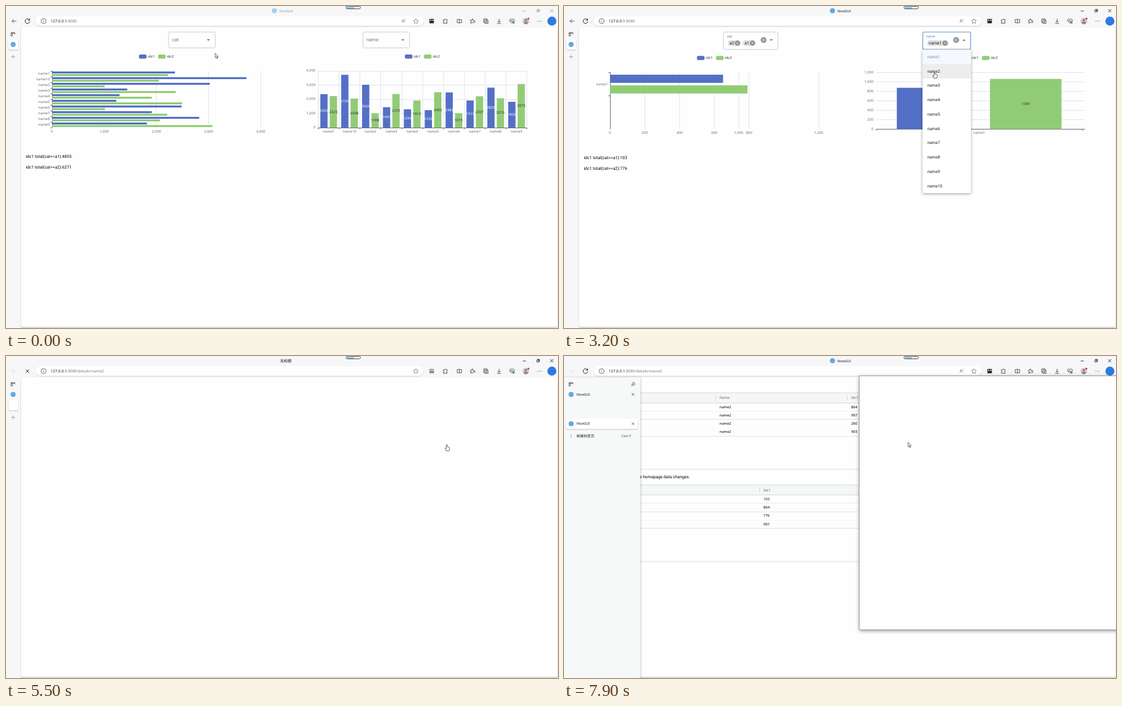
An HTML page with a canvas for the animation above (8000 ms loop, 876 by 511 pixels).

```html
<!DOCTYPE html>
<html lang="en">
<head>
<meta charset="utf-8">
<title>Dashboard</title>
<style>
html, body { margin: 0; width: 100%; height: 100%; overflow: hidden; background: #f7f7f8; }
canvas { display: block; }
</style>
</head>
<body>
<canvas id="stage" width="876" height="511"></canvas>
<script>
const ctx = document.getElementById('stage').getContext('2d');
const UI = '"Noto Sans", "Noto Sans CJK SC", sans-serif', PAGE = 'Roboto, sans-serif';
const BLUE = '#5470c6', GREEN = '#91cc75', PRIMARY = '#5898d4', LOGO = '#62a8e5';
const INK = '#333', AXIS = '#6e7079', GRID = '#e0e6f1';
const LOOP = 8000, STEP = 100;

// ---- data ----
const NAMES = ['name1', 'name10', ...[2, 3, 4, 5, 6, 7, 8, 9].map(i => 'name' + i)];
const all = [[2356, 3725, 3024, 1441, 1294, 1232, 2483, 1913, 2820, 1820],
             [2223, 2048, 1008, 2370, 1913, 2493, 1015, 2207, 2070, 3073]];
const a1 = [[103, 992, 864, 213, 76, 601, 499, 689, 710, 108],
            [977, 779, 186, 790, 705, 542, 159, 61, 501, 951]];
const a2 = [[776, 950, 997, 420, 510, 230, 760, 388, 720, 520],
            [92, 410, 342, 640, 520, 810, 330, 900, 620, 880]];
const both = a1.map((row, k) => row.map((v, i) => v + a2[k][i]));
const pick = ids => both.map(row => ids.map(i => row[i]));
const state = (at, names, values, max, step, cats, chosen, totals) =>
  ({ at, names, values, max, step, cats, chosen, totals });
const STATES = [
  state(-1e4, NAMES, all, 4000, 1000, [], [], [4855, 6271]),
  state(834, NAMES, a1, 1000, 200, ['a1'], [], [4855, 0]),
  state(1500, NAMES, both, 2000, 500, ['a2', 'a1'], [], [4855, 6271]),
  state(2947, ['name1'], pick([0]), 1200, 200, ['a2', 'a1'], ['name1'], [103, 776]),
  state(3700, ['name1', 'name2'], pick([0, 2]), 2100, 300, ['a2', 'a1'], ['name1', 'name2'], [967, 1773])
];
const TRACK = [
  [0, 332, 75], [500, 295, 54], [800, 272, 79], [900, 272, 80], [1100, 285, 99], [1500, 285, 99],
  [2000, 380, 60], [2400, 600, 54], [2700, 590, 78], [3000, 590, 78], [3200, 588, 104], [3700, 588, 104],
  [4300, 539, 162], [4500, 542, 163], [4800, 765, 175], [5100, 699.5, 140], [6100, 699.5, 140],
  [6500, 120, 160], [6900, 57, 85], [7100, 14, 78], [7600, 30, 76], [7700, 60, 104], [7900, 546, 137]
];

// ---- helpers ----
const clamp = v => Math.max(0, Math.min(1, v));
const mix = (a, b, p) => a + (b - a) * p;
const cubicInOut = u => u < .5 ? 4 * u ** 3 : 1 - (2 - 2 * u) ** 3 / 2;
const between = (t, a, b) => t >= a && t < b;

function text(str, x, y, size, color = INK, font = UI, align = 'left') {
  ctx.font = `${size}px ${font}`;
  ctx.textAlign = align;
  ctx.fillStyle = color;
  ctx.fillText(str, x, y);
}
function rect(x, y, w, h, color) {
  ctx.fillStyle = color;
  ctx.fillRect(x, y, w, h);
}
const hline = (x, y, w, color) => rect(x, Math.floor(y), w, 1, color);
const vline = (x, y, h, color) => rect(Math.floor(x), y, 1, h, color);
function box(x, y, w, h, r, fill, stroke, width = 1) {
  ctx.beginPath();
  ctx.roundRect(x, y, w, h, r);
  if (fill) { ctx.fillStyle = fill; ctx.fill(); }
  if (stroke) { ctx.strokeStyle = stroke; ctx.lineWidth = width; ctx.stroke(); }
}
function shadowed(blur, draw, alpha = .3) {
  ctx.save();
  ctx.shadowColor = `rgba(0,0,0,${alpha})`;
  ctx.shadowBlur = blur;
  ctx.shadowOffsetY = 1;
  draw();
  ctx.restore();
}
function dot(x, y, r, color) {
  ctx.beginPath();
  ctx.arc(x, y, r, 0, 7);
  ctx.fillStyle = color;
  ctx.fill();
}
function icon(x, y, d, color = INK, fill = null, width = .8) {
  const path = new Path2D(d);
  ctx.save();
  ctx.translate(x, y);
  ctx.lineWidth = width;
  ctx.lineJoin = 'round';
  if (fill) { ctx.fillStyle = fill; ctx.fill(path); }
  ctx.strokeStyle = color;
  ctx.stroke(path);
  ctx.restore();
}
const CROSS = 'M-2.5-2.5L2.5 2.5M2.5-2.5L-2.5 2.5', SMALL_CROSS = 'M-1.5-1.5L1.5 1.5M1.5-1.5L-1.5 1.5';
const STAR = 'M0-4L1.2-1.3L4-1L1.9.9L2.5 3.7L0 2.3L-2.5 3.7L-1.9.9L-4-1L-1.2-1.3Z';
const PLUS = 'M-3 0H3M0-3V3';

function pointerAt(t) {
  const i = TRACK.findIndex(k => k[0] > t);
  if (i < 0) return TRACK[TRACK.length - 1].slice(1);
  const [t0, x0, y0] = TRACK[i - 1], [t1, x1, y1] = TRACK[i];
  const u = (t - t0) / (t1 - t0), p = u * u * (3 - 2 * u);
  return [mix(x0, x1, p), mix(y0, y1, p)];
}

// ---- browser frame ----
function browser(t, details, loading) {
  rect(0, 0, 876, 511, '#f7f7f8');
  const active = t >= 500, ink = active ? '#111' : '#999';
  if (loading) text('无标题', 444, 8, 6, '#000', '500 ' && UI, 'center');
  else {
    dot(426, 7.5, 4, active ? LOGO : '#a9cff0');
    text('NiceGUI', 434, 8, 5.5, ink);
  }
  box(539.5, .5, 23, 4, 2, '#fff', '#555');
  rect(541, 2, 11, 1.5, '#4aa3e8');
  icon(822.5, 8, 'M-2.5 0H2.5', ink);
  icon(844.5, 7.5, 'M-2-1H1V2H-2ZM-1-1V-2.2H2.2V1H1', ink);
  icon(866, 7.5, CROSS, ink);

  icon(13, 24, 'M3.5 0H-3.5M-.5-3L-3.5 0L-.5 3', details ? '#ddd' : INK);
  icon(34, 24, loading ? CROSS : 'M3.3-1.7A3.7 3.7 0 1 0 3.7.5M3.4-4V-1.5H1', INK, null, 1);
  shadowed(1, () => box(47, 16.5, 615.5, 15, 7.5, '#fff'), .15);
  icon(59.7, 24, 'M4 0A4 4 0 1 1-4 0A4 4 0 1 1 4 0M0-.5V2M0-2.2V-1.4', '#555');
  text('127.0.0.1', 71, 24, 6.1, '#111');
  text(':8080' + (details ? '/details/name2' : ''), 71 + ctx.measureText('127.0.0.1').width, 24, 6.1, '#777');
  if (!loading) text('A⁾', 628, 24, 7, '#666');
  icon(650.5, 24, STAR, '#555', null, .6);
  icon(675.5, 24, 'M-3.2-3H3.2V3H-3.2Z', loading ? '#888' : '#222', loading ? '#888' : '#222');
  rect(673, 22, 2, 1.5, '#fff');
  rect(676.3, 22, 2, 1.5, '#fff');
  icon(697, 24, 'M-3-2H-1A1 1 0 0 1 1-2.5H3V-.5A1 1 0 0 0 3 1.5V3.3H-3V1.5A1 1 0 0 0-3-.5Z');
  icon(719.5, 24, 'M-1-2.5H-3.5V2.5H-1M1-2.5H3.5V2.5H1M0-4V4');
  icon(740.5, 24, 'M1.2 2.5L-.5 2L-3 3.4L-2.4.6L-4-1L-1.5-1.3L-.5-3.8L.8-1.3L3.5-1M1 .5H4M2 2.2H4');
  icon(761.5, 24, 'M-1.5 2H-3.5L-3.5-3.5H2V-2M-1.5-1.5H3.5V3.5H-1.5ZM1-.3V2.3M-.3 1H2.3');
  icon(782.5, 24, 'M0-3.5V1.8M-2.2-.2L0 2L2.2-.2M-3 3.7H3');
  icon(803, 24, 'M0 3.3L-3.5 0A2 2 0 0 1 0-2.4A2 2 0 0 1 3.5 0ZM-3 0H-1L0-1L1 1L2 0');
  dot(805.5, 26.3, 1.7, '#4b9b45');
  dot(825, 24, 5.3, '#cfcac8');
  dot(825, 22.5, 2, '#8c8583');
  box(821.8, 25, 6.4, 3.4, 1.7, '#8c8583');
  dot(829, 20, 1.6, '#d8303a');
  for (const x of [844, 846.7, 849.4]) dot(x, 24, .6, INK);
  dot(866.3, 24, 7.2, '#2d7be0');

  shadowed(2, () => box(24, 34, 851, 475.5, 3, '#fefefe'), .28);
}

const tabCard = (y, w) => shadowed(2, () => box(4, y - 8.3, w, 16.5, 2.5, '#fff'), .22);
const tabList = () => icon(11, 45, 'M-3-2.5H3M-3-2.2H3M-3-2.5V2.5H-.8V-2M3-2.5V0');

function sidebar(details, loading) {
  tabList();
  tabCard(details ? 78 : 61, 15);
  dot(11.3, 61, 4, LOGO);
  if (details && !loading) dot(11.3, 78, 4, LOGO);
  icon(11.3, details ? 97.5 : 80.5, PLUS, '#777', null, .6);
}

function sidePane(t) {
  const w = mix(24, 121, clamp((t - 7050) / 200));
  const dragged = t >= 7700, y = dragged ? 107.5 : 78;
  ctx.save();
  shadowed(4, () => rect(0, 34, w, 477, '#f7f8f8'), .3);
  ctx.beginPath();
  ctx.rect(0, 34, w, 477);
  ctx.clip();
  tabList();
  icon(110, 44.5, 'M0-3L3 0L1.5.5L0 2.5L-2.5 0L-.5-1.5ZM-1.2 1.2L-3.3 3.3');
  tabCard(y, 113);
  for (const row of [61, y]) {
    dot(11.3, row, 4, LOGO);
    text('NiceGUI', 20, row, 5.5, '#111');
    icon(109.5, row, 'M-1.8-1.8L1.8 1.8M1.8-1.8L-1.8 1.8');
  }
  icon(11.3, y + 19.7, dragged ? 'M0-3V3' : PLUS, '#777', null, .6);
  text('新建标签页', 20, y + 19.7, 5.6, '#111');
  text('Ctrl+T', 91, y + 19.7, 5.6, '#444');
  ctx.restore();
}

// ---- charts ----
function transition(t, delay) {
  let i = STATES.length - 1;
  while (i > 0 && STATES[i].at + delay > t) i--;
  const next = STATES[i];
  return { next, prev: STATES[Math.max(0, i - 1)], p: cubicInOut(clamp((t - next.at - delay) / 300)) };
}

// Slot along the category axis and length along the value axis, all as fractions.
function place(s, name, k) {
  const i = s.names.indexOf(name), n = s.names.length, size = .8 / 2.3;
  return i < 0 ? null : { pos: (i + .1 + k * 1.3 * size) / n, size: size / n, len: s.values[k][i] / s.max };
}

function chart(t, horizontal, top) {
  const { prev, next, p } = transition(t, horizontal ? 120 : 0);
  const left = horizontal ? 73 : 495.5, W = 331.3, H = 90, bottom = top + H, n = next.names.length;
  const label = (s, x, y, align = 'center', color = AXIS) => text(s, x, y, 5.7, color, UI, align);

  const legend = horizontal ? 211 : 633;
  [BLUE, GREEN].forEach((color, k) => {
    box(legend + k * 30.3, top - 26, 12, 6.5, 2, color);
    label('idc' + (k + 1), legend + 14 + k * 30.3, top - 22.8, 'left', INK);
  });

  for (let v = 0; v <= next.max; v += next.step) {
    const shared = v <= prev.max && v % prev.step === 0;
    const f = mix(shared ? v / prev.max : v / next.max, v / next.max, p);
    const caption = v.toLocaleString('en-US');
    if (horizontal) {
      vline(left + f * W, top, H, GRID);
      label(caption, left + f * W, bottom + 6.3);
    } else {
      hline(left, bottom - f * H, W, GRID);
      label(caption, 491, bottom - f * H - .3, 'right');
    }
  }
  for (let i = 0; i <= n; i++) {
    const f = mix(Math.min(1, i / prev.names.length), i / n, p);
    if (horizontal) hline(left - 2.5, top + f * H, 2.5, AXIS);
    else {
      if (n > 1) vline(left + f * W, top, H, GRID);
      vline(left + f * W, bottom, 2.5, AXIS);
    }
  }
  if (horizontal) vline(left, top, H, AXIS);
  else hline(left, bottom, W, AXIS);

  const captions = [];
  next.names.forEach((name, i) => {
    const old = prev.names.indexOf(name), to = (i + .5) / n;
    const c = mix(old < 0 ? to : (old + .5) / prev.names.length, to, p);
    if (horizontal) label(name, 69.5, top + c * H, 'right');
    else label(name, left + c * W, bottom + 6.3);
    [BLUE, GREEN].forEach((color, k) => {
      const b = place(next, name, k), a = place(prev, name, k) || { ...b, len: 0 };
      const pos = mix(a.pos, b.pos, p), size = mix(a.size, b.size, p), len = mix(a.len, b.len, p);
      if (horizontal) rect(left, top + pos * H, len * W, size * H, color);
      else {
        rect(left + pos * W, bottom - len * H, size * W, len * H, color);
        captions.push([next.values[k][i], left + (pos + size / 2) * W, bottom - len * H / 2, k ? INK : '#fff']);
      }
    });
  });
  for (const [v, x, y, color] of captions) label(v, x, y, 'center', color);
}

// ---- selects ----
function crossBadge(x, y, r, color) {
  dot(x, y, r, color);
  icon(x, y, SMALL_CROSS, '#fff');
}

function field(x, w, title, chips, stride, open, tall) {
  const bottom = tall ? 69.5 : 67;
  box(x + .5, 41.3, w - 1, bottom - 41.8, 2, '#fefefe', open ? PRIMARY : '#c4c4c4', open ? 1.1 : .8);
  const float = open || chips.length;
  text(title, x + 6, float ? 48.7 : 54, float ? 5.7 : 7.6, open ? PRIMARY : '#777', PAGE);
  chips.forEach((chip, i) => {
    const cx = x + 7.3 + i * stride, cw = stride - 2.4;
    box(cx, 54.3, cw, 9.2, 4.6, '#e0e0e0');
    text(chip, cx + 2.8, 59, 6.63, '#222', PAGE);
    crossBadge(cx + cw - 6, 58.8, 3.9, '#8a8a8a');
  });
  if (chips.length) crossBadge(x + w - 23.5, 54, 4.7, '#999');
  icon(x + w - 11.3, 54, open ? 'M-2.2 1.1L0-1.1L2.2 1.1Z' : 'M-2.2-1.1L0 1.1L2.2-1.1Z', '#666', '#666', .3);
}

function menu(x, w, top, items, chosen, pointer) {
  const rowH = 22.75;
  shadowed(4, () => box(x, top, w, items.length * rowH, 2, '#fff'), .4);
  const hovered = Math.floor((pointer[1] - top) / rowH);
  items.forEach((item, i) => {
    const y = top + i * rowH, on = chosen.includes(item);
    if (i === hovered) rect(x, y, w, rowH, '#ededed');
    else if (on) rect(x, y, w, rowH, '#f5f8fc');
    text(item, x + 7.6, y + rowH / 2, 6.63, on ? PRIMARY : '#222', PAGE);
  });
}

function dashboard(t, pointer) {
  const { next } = transition(t, 0), tall = next.cats.length > 0, dy = tall ? 2.3 : 0;
  const catOpen = between(t, 500, 2000), nameOpen = between(t, 2500, 3900);
  chart(t, true, 103 + dy);
  chart(t, false, 103 + dy);
  next.totals.forEach((sum, i) =>
    text(`idc1 total(cat==a${i + 1}):${sum}`, 31.5, 238.6 + dy + i * 17.6, 6.63, '#000', PAGE));

  const width = (chips, stride) => Math.max(75, 40.2 + chips.length * stride);
  const wa = width(next.cats, 23.7), wb = width(next.chosen, 36.8);
  const gap = (850.5 - wa - wb) / 3, xa = 24 + gap, xb = xa + wa + gap;
  field(xa, wa, 'cat', next.cats, 23.7, catOpen, tall);
  field(xb, wb, 'name', next.chosen, 36.8, nameOpen, tall);
  const top = tall ? 69.5 : 67;
  if (catOpen) menu(xa, wa, top, ['a1', 'a2', 'a3', 'a4'], next.cats, pointer);
  if (nameOpen) menu(xb, wb, top, Array.from({ length: 10 }, (_, i) => 'name' + (i + 1)), next.chosen, pointer);
}

// ---- details page ----
function table(top, heads, rows, pointer) {
  const x = 32, w = 835.5, colW = w / heads.length, rowH = 13.27, body = top + 15.9;
  rect(x, top, w, 16, '#f5f7f7');
  heads.forEach((h, c) => {
    text(h, x + c * colW + 6, top + 8.4, 5.7, '#666');
    vline(x + (c + 1) * colW - .5, top + 4, 8, '#d5d9dc');
  });
  rows.forEach((row, r) => {
    const y = body + r * rowH, hover = between(pointer[1], y, y + rowH) && between(pointer[0], x, x + w);
    if (hover) rect(x, y, w, rowH, '#ecf0f1');
    else if (r % 2) rect(x, y, w, rowH, '#fcfdfe');
    hline(x, y + rowH, w, '#e1e4e6');
    row.forEach((cell, c) => text(cell, x + c * colW + 6, y + rowH / 2 + .2, 5.7, '#000'));
  });
  hline(x, body, w, '#d5d9dc');
  box(x + .5, top + .2, w - 1, 121.4, 0, null, '#d0d5d8', .8);
}

function detailsPage(pointer) {
  text('This table data will not change', 31.5, 45.5, 6.63, '#000', PAGE);
  table(58.3, ['Cat', 'Name', 'Idc1', 'Idc2'], [
    ['a1', 'name2', 864, 186], ['a2', 'name2', 997, 342],
    ['a3', 'name2', 260, 136], ['a4', 'name2', 903, 344]], pointer);
  text('This table will change when the homepage data changes.', 31.5, 191.7, 6.63, '#000', PAGE);
  table(204.6, ['Name', 'Idc1', 'Idc2'], [
    ['name1', 103, 977], ['name2', 864, 186], ['name1', 776, 92], ['name2', 997, 342]], pointer);
}

function cursor(t, [x, y]) {
  const hand = between(t, 400, 1900) || between(t, 2400, 3800) || between(t, 4200, 6100);
  icon(x, y, hand
    ? 'M-.8 1Q0-.4.8 1V4L3.6 4.8Q4.5 5.2 4.3 7L3.6 10.5H-.8L-2.8 6.8Q-2.6 5.6-.8 7Z'
    : 'M0 0V7.2L1.7 5.7L2.8 8.4L4 7.9L2.8 5.3H5Z', '#333', '#fff', .7);
}

function render(t) {
  const pointer = pointerAt(t), details = t >= 5500, loading = between(t, 5500, 5700);
  ctx.textBaseline = 'middle';
  ctx.textRendering = 'geometricPrecision';
  browser(t, details, loading);
  sidebar(details, loading);
  if (!details) dashboard(t, pointer);
  else if (!loading) detailsPage(pointer);
  if (t >= 7100) sidePane(t);
  if (t >= 7800) {
    const wx = Math.round(pointer[0] - 78) + .5, wy = Math.round(pointer[1] - 106) + .5;
    shadowed(6, () => box(wx, wy, 430, 403, 0, '#fefefe'), .45);
    box(wx, wy, 430, 403, 0, '#fefefe', '#8a8a8a', .8);
  }
  cursor(t, pointer);
}

function frame() {
  render(Math.floor(performance.now() % LOOP / STEP) * STEP);
  requestAnimationFrame(frame);
}
frame();
</script>
</body>
</html>
```
